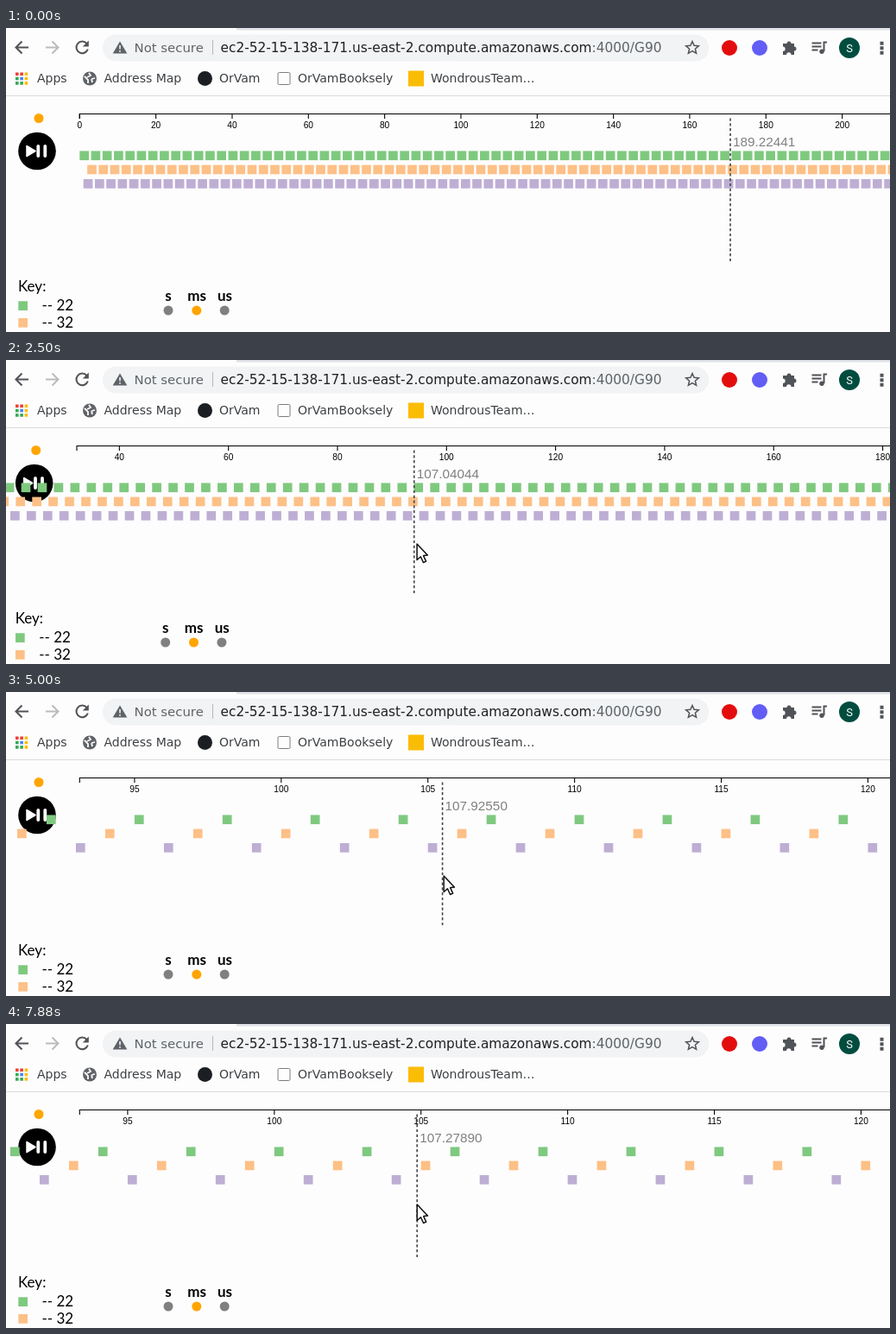
Write an HTML page that moves like this. It is 1024 px wide and 352 px high and loops after 8 s.

```html
<!DOCTYPE html>
<html lang="en">
<head>
<meta charset="utf-8">
<title>Event timeline</title>
<style>
  html, body { margin: 0; width: 100%; height: 100%; overflow: hidden; background: #fefdfe; }
  svg { display: block; width: 100%; height: 100%; }
  .ui { font-family: "DejaVu Sans", sans-serif; fill: #3c4043; }
  .bookmarks { font-size: 14px; }
  .key { font: 17px Lato, sans-serif; }
  .units { font: bold 17px Lato, sans-serif; text-anchor: middle; }
  .axis { font: 10.2px "Liberation Sans", Arial, sans-serif; text-anchor: middle; }
  .readout { font: 15.3px "Liberation Sans", Arial, sans-serif; fill: #808080; }
  .stroke { fill: none; stroke: #505357; stroke-width: 2; }
</style>
</head>
<body>
<svg viewBox="0 0 1024 352">
  <defs><clipPath id="plot"><rect x="3.3" y="80" width="1400" height="272"/></clipPath></defs>

  <!-- Browser toolbar -->
  <rect x="267" width="757" height="2.5" fill="#dee1e6"/>
  <path class="stroke" d="M26 22.500H12M18.500 15.500L11.500 22.500L18.500 29.500"/>
  <path class="stroke" style="stroke:#babcbe" d="M46 22.500H60M53.500 15.500L60.500 22.500L53.500 29.500"/>
  <path class="stroke" d="M93.500 18A6.800 6.800 0 1 0 94.800 24.500"/>
  <path d="M95.800 14.500V21.500H88.800Z" fill="#505357"/>
  <rect x="112" y="7.500" width="702" height="31" rx="15.500" fill="#f1f3f4"/>
  <path d="M132 15.500L140.300 29.500H123.700Z" fill="#5f6368"/>
  <path d="M132 20V24.500M132 26V27.700" stroke="#f1f3f4" stroke-width="1.600"/>
  <path d="M239.500 14V31" stroke="#b4b7ba"/>
  <g class="ui">
    <text x="148.500" y="28" font-size="14.900" style="fill:#5f6368">Not secure</text>
    <text x="248.500" y="28" font-size="15.360" style="fill:#202124">ec2-52-15-138-171.us-east-2.compute.amazonaws.com<tspan fill="#5f6368">:4000/G90</tspan></text>
  </g>
  <path class="stroke" style="stroke-width:1.500" d="M795 15.500L797.100 20.300L802.300 20.800L798.400 24.200L799.600 29.300L795 26.600L790.400 29.300L791.600 24.200L787.700 20.800L792.900 20.300Z"/>
  <circle cx="838" cy="23" r="9" fill="#e40d0d"/>
  <circle cx="873" cy="23" r="9" fill="#625df5"/>
  <path fill="#505357" d="M900 18H904.500A2.500 2.500 0 1 1 909.500 18H913V21.500A2.500 2.500 0 1 1 913 26.500V31H909.500A2.500 2.500 0 0 0 904 31H900V26.800A2.500 2.500 0 0 0 900 21.600Z"/>
  <path class="stroke" d="M933.500 17.500H944.500M933.500 21.500H944.500M933.500 25.500H940.500M947.500 27V16.500H951"/>
  <circle cx="945" cy="27.300" r="2.700" fill="#505357"/>
  <circle cx="977" cy="23" r="12" fill="#004d40"/>
  <text x="977" y="27.500" text-anchor="middle" font-family="Roboto, sans-serif" font-size="13" fill="#fff">S</text>
  <path d="M1012.500 15.800h4v4h-4zm0 5.500h4v4h-4zm0 5.500h4v4h-4z" fill="#505357"/>

  <!-- Bookmarks -->
  <g id="apps"></g>
  <circle cx="97" cy="58.500" r="8" fill="#5f6368"/>
  <path d="M91 56L95 60L95 64M96 52L98 55L94 57M99 59L103 58M99 59L100 63" fill="none" stroke="#fefdfe" stroke-width="1.800"/>
  <circle cx="230.500" cy="58.500" r="8.500" fill="#1b1f23"/>
  <rect x="315" y="51.500" width="14" height="14" rx="1.500" fill="none" stroke="#7b7d80"/>
  <rect x="466" y="49.500" width="18" height="18" fill="#fbbc04"/>
  <g class="ui bookmarks">
    <text x="36" y="63">Apps</text>
    <text x="113.500" y="63">Address Map</text>
    <text x="247" y="63">OrVam</text>
    <text x="338" y="63">OrVamBooksely</text>
    <text x="492" y="63">WondrousTeam…</text>
  </g>
  <path d="M0 78.500H1024" stroke="#d9dadd"/>

  <!-- Page -->
  <g id="page">
    <circle cx="38" cy="104.500" r="5.500" fill="#ffa500"/>
    <circle cx="36" cy="142.500" r="21.800"/>
    <path d="M24 136.500L34 142.500L24 148.500Z" fill="#fff" stroke="#fff" stroke-width="1.500" stroke-linejoin="round"/>
    <path d="M37.300 137V148M45.300 137V148" stroke="#fff" stroke-width="3.800" stroke-linecap="round"/>
    <g class="key">
      <text x="14" y="305">Key:</text>
      <text x="41.500" y="327">-- 22</text>
      <text x="41.500" y="346.500">-- 32</text>
    </g>
    <rect x="14.300" y="316.300" width="10.700" height="10.700" fill="#7fc97f"/>
    <rect x="14.300" y="336" width="10.700" height="10.700" fill="#fdc086"/>
    <g class="units">
      <text x="188" y="316">s</text><text x="221" y="316">ms</text><text x="253.500" y="316">us</text>
    </g>
    <circle cx="188" cy="327" r="5.500" fill="#808080"/>
    <circle cx="220.800" cy="327" r="5.500" fill="#ffa500"/>
    <circle cx="253.200" cy="327" r="5.500" fill="#808080"/>
    <g id="chart" clip-path="url(#plot)"></g>
    <path id="rule" d="M0 104.500V271" stroke="#45454a" stroke-width="1.600" stroke-dasharray="3.200 2.600"/>
    <text id="readout" class="readout" y="137"></text>
  </g>
  <path id="cursor" d="M0 0V18.500L4.300 14.800L7.400 21.500L10.500 20.100L7.500 13.600L12.300 13Z" fill="#fff" stroke="#111" stroke-width="1.500" stroke-linejoin="round"/>
</svg>

<script>
const $ = id => document.getElementById(id);

const LOOP = 8000, STEP = 125;
const EDGE = 3.3, AXIS_X = 85.3, AXIS_WIDTH = 1325;
const ZOOM_X = 476.06, ZOOM_VALUE = 107.04044;
const BASE_SCALE = (ZOOM_X - EDGE) / ZOOM_VALUE;

// Key poses: [step, value], linear in between.
const pointerX = [[4, 839.04], [11, ZOOM_X], [35.3, ZOOM_X], [42, 518.16], [45, 493.4], [49, 493.4], [55, 459.4], [60, 476.2]];
const pointerY = [[4, 380], [11, 213], [45, 213], [55, 210], [62, 210], [63, 209]];
const hovered = [[4, 189.22441], [11, ZOOM_VALUE], [35, ZOOM_VALUE], [42, 108.27953], [49, 108.27953], [55, 107.2789]];
const zoom = [[16, 0], [20, Math.log(1.43)], [22, Math.log(1.43)], [25, Math.log(2.5)], [29, Math.log(7.694)]];
const pan = [[42, 0], [45, -24.8], [55, -24.8], [60, -8]];

// Each row repeats every three units, starting from its own phase.
const rows = [
  { y: 142.4, color: '#7fc97f', phase: 0 },
  { y: 158.6, color: '#fdc086', phase: 2 },
  { y: 175, color: '#beaed4', phase: 1 }
];

function at(track, step) {
  const next = track.findIndex(([s]) => s > step);
  if (next === 0) return track[0][1];
  if (next < 0) return track[track.length - 1][1];
  const [s0, v0] = track[next - 1], [s1, v1] = track[next];
  return v0 + (v1 - v0) * (step - s0) / (s1 - s0);
}

function tickSize(span) {
  const raw = span / 10, power = 10 ** Math.floor(Math.log10(raw)), rest = raw / power;
  return power * (rest >= Math.sqrt(50) ? 10 : rest >= Math.sqrt(10) ? 5 : rest >= Math.sqrt(2) ? 2 : 1);
}

function chart(step) {
  const scale = BASE_SCALE * Math.exp(at(zoom, step));
  const origin = ZOOM_VALUE - (ZOOM_X - EDGE + at(pan, step)) / scale;
  const toX = value => AXIS_X + (value - origin) * scale;
  let out = `<path d="M${AXIS_X} 105V99.500H1410" fill="none" stroke="#000" stroke-width="1.100"/><g class="axis">`;

  const size = tickSize(AXIS_WIDTH / scale);
  for (let v = Math.ceil((origin - 0.01) / size) * size; toX(v) < 1045; v += size) {
    const x = toX(v).toFixed(2);
    out += `<path d="M${x} 99.500V105" stroke="#000" stroke-width="1.100"/><text x="${x}" y="116">${v}</text>`;
  }
  out += '</g>';

  const shift = Math.floor((step + 5) / 16);
  for (const { y, color, phase } of rows) {
    for (let v = (phase + shift) % 3; toX(v) < 1030; v += 3) {
      if (toX(v) > -12) out += `<rect x="${toX(v).toFixed(2)}" y="${y}" width="10.700" height="10.700" fill="${color}"/>`;
    }
  }
  return out;
}

function draw(step) {
  const x = at(pointerX, step), scroll = step >= 18 && step <= 22 ? -EDGE : 0;
  $('page').setAttribute('transform', `translate(${scroll})`);
  $('chart').innerHTML = chart(step);
  $('rule').setAttribute('transform', `translate(${x})`);
  $('readout').setAttribute('x', x + 3);
  $('readout').textContent = at(hovered, step).toFixed(5);
  // The cursor runs slightly ahead of the rule.
  $('cursor').setAttribute('transform', `translate(${at(pointerX, step + 0.25)} ${at(pointerY, step)})`);
}

const [red, yellow, green, blue] = ['#ea4335', '#fbbc04', '#34a853', '#4285f4'];
$('apps').innerHTML = [red, red, yellow, green, blue, yellow, green, green, yellow].map((color, i) =>
  `<rect x="${11 + i % 3 * 5.3}" y="${51.500 + Math.floor(i / 3) * 5.3}" width="3.600" height="3.600" fill="${color}"/>`).join('');

let shown = -1;
function frame() {
  const step = Math.floor(performance.now() % LOOP / STEP);
  if (step !== shown) draw(shown = step);
  requestAnimationFrame(frame);
}
frame();
</script>
</body>
</html>
```
